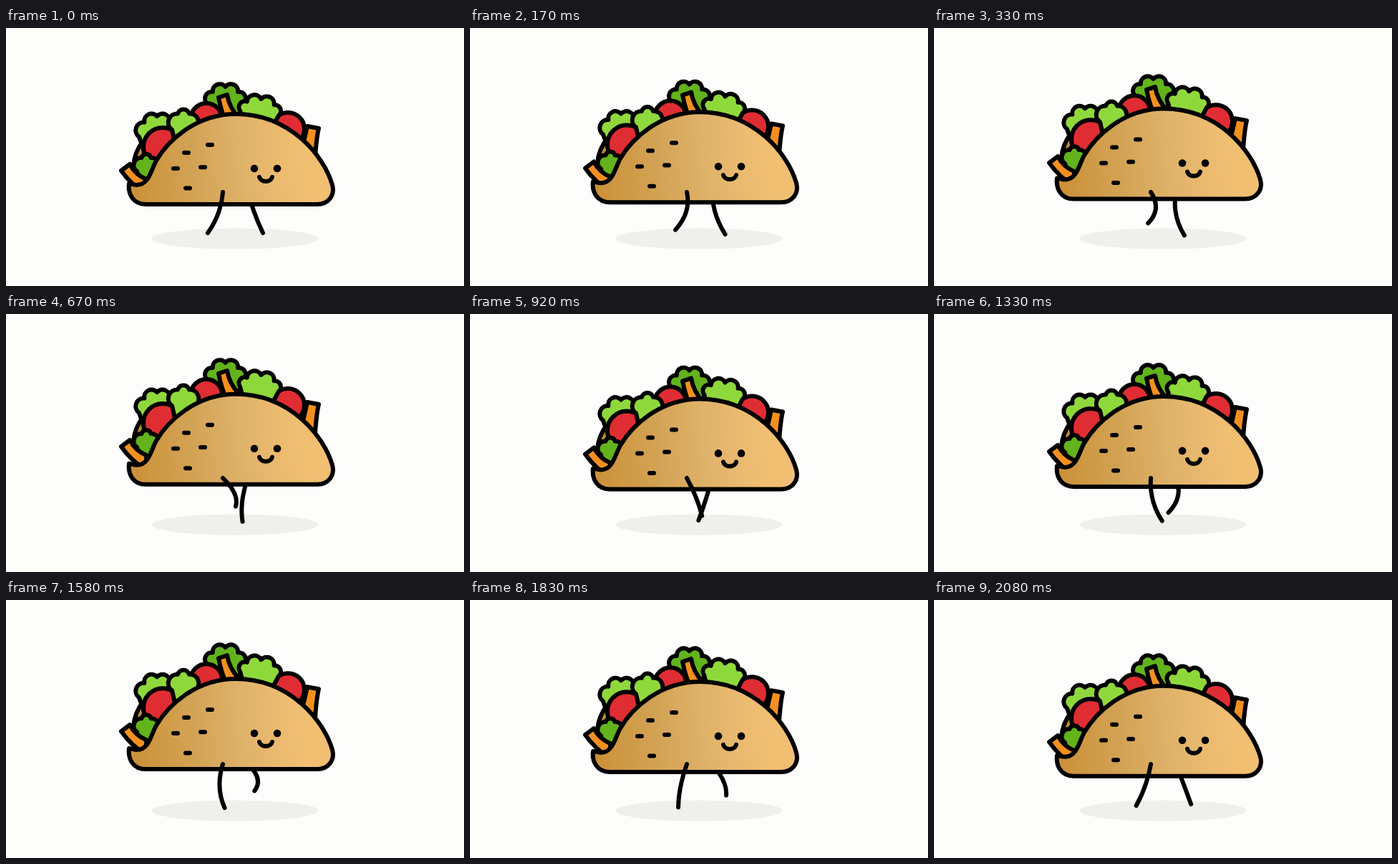
Recreate the animation shown at these times as an HTML page. Size 640 px wide and 360 px high, loop 2.16 s.

```html
<!DOCTYPE html>
<html lang="en">
<head>
<meta charset="utf-8">
<title>Walking taco</title>
<style>
  html, body { margin: 0; width: 100%; height: 100%; overflow: hidden; background: #fdfdfc; }
  svg { display: block; width: 100vw; height: 100vh; }
  .ink { stroke: #000; stroke-width: 6; stroke-linecap: round; stroke-linejoin: round; }
  .line { fill: none; }
  .dark { fill: #62b31c; }
  .light { fill: #8fd83c; }
  .tomato { fill: #e02d33; }
  .carrot { fill: #f39020; }
</style>
</head>
<body>
<svg viewBox="0 0 640 360">
  <defs>
    <linearGradient id="shell" gradientUnits="userSpaceOnUse" x1="172" y1="200" x2="456" y2="180">
      <stop offset="0" stop-color="#cb9038"/>
      <stop offset=".3" stop-color="#d2a253"/>
      <stop offset=".55" stop-color="#dfb26a"/>
      <stop offset=".85" stop-color="#f1bf72"/>
    </linearGradient>
  </defs>
  <ellipse cx="320" cy="294" rx="117" ry="14.5" fill="#efefec"/>
  <path id="backLeg" class="ink line"/>
  <g id="filling" class="ink"></g>
  <g id="body">
    <path class="ink" fill="url(#shell)" d="M195 246H435C450 246 460 234 456 219C445 180 398 120 321 120C265 120 226 158 210 185C203 197 200 219 183 219C178 219 175 217 172 217C170 232 178 246 195 246Z"/>
    <path class="ink line" d="M282 163h6M249 174h6M234 196h6M272 194.2h6M251 223.5h6"/>
    <circle cx="347" cy="196" r="5.3"/>
    <circle cx="379" cy="196" r="5.3"/>
    <path class="ink line" d="M354 208A9.2 7.6 0 0 0 372 208"/>
  </g>
  <path id="frontLeg" class="ink line"/>
</svg>
<script>
const LOOP = 2160, STEPS = 26, HIP_Y = 229, TURN = 2 * Math.PI;
const byId = id => document.getElementById(id);
const filling = byId('filling'), body = byId('body');

function add(tag, kind, attrs) {
  const el = document.createElementNS('http://www.w3.org/2000/svg', tag);
  el.setAttribute('class', kind);
  for (const k in attrs) el.setAttribute(k, attrs[k]);
  filling.append(el);
}
const shape = (kind, d) => add('path', kind, { d });
const slice = (cx, cy, r) => add('circle', 'tomato', { cx, cy, r });

// A leaf: equal lobes around the upper half of an ellipse, closed by a tapering base.
function leaf(kind, cx, cy, rx, ry, lobes, tilt = 0) {
  let d = '', px, py;
  for (let i = 0; i <= lobes; i++) {
    const a = Math.PI * (1 + i / lobes);
    const x = cx + rx * Math.cos(a), y = cy + ry * Math.sin(a);
    const r = Math.hypot(x - px, y - py) * 0.52;
    d += i ? `A${r} ${r} 0 0 1 ${x} ${y}` : `M${x} ${y}`;
    [px, py] = [x, y];
  }
  d += `L${cx + rx * 0.6} ${cy + 28}H${cx - rx * 0.6}Z`;
  add('path', kind, { d, transform: `rotate(${tilt} ${cx} ${cy})` });
}

add('path', '', { d: 'M192 157C185 166 179 179 178 192L205 215L215 165Z', fill: '#c28a35' });
leaf('light', 211, 152, 25, 29, 4);
slice(219, 166, 27);
leaf('dark', 196, 200, 13, 22, 3);
shape('carrot', 'M161 199L173 190Q181 205 196 211V232Q174 218 161 199Z');
leaf('dark', 306.5, 106, 25, 24, 4);
slice(280, 127, 22);
leaf('light', 248, 142, 16, 26, 3);
shape('carrot', 'M297 97L309 93Q312 111 325 125L309 135Q301 118 297 97Z');
shape('carrot', 'M421 137L437 140Q434 152 432 180L412 175Q417 155 421 137Z');
slice(394, 141, 23);
leaf('light', 354, 119, 27, 20, 4, 7);

// First half of the cycle swings the foot forward, second half pushes it back.
function drawLeg(id, hipX, step) {
  const a = TURN * step / STEPS, s = Math.sin(a);
  const swing = Math.max(0, s) ** 2;
  const x = 12 * swing - 21 * Math.cos(a);
  const y = 57 + 4 * Math.max(0, -s) - 20 * swing;
  const knee = 3 + 15 * Math.sin(a + 0.36);
  byId(id).setAttribute('d', `M${hipX} ${HIP_Y}q${x / 2 + knee} ${y / 2 + 2} ${x} ${y}`);
}

// Two bounces per loop, each lifting the element by up to height.
function bounce(el, height, step, lead) {
  const y = height / 2 * (Math.cos(TURN * 2 * (step + lead) / STEPS) - 1);
  el.setAttribute('transform', `translate(0 ${y})`);
}

function draw(time) {
  // Twelve poses a second, switched on whole hundredths
  const tick = Math.floor((time % LOOP) / 10) * 10;
  const step = Math.floor((tick + 5) * 0.012);
  bounce(body, 10, step, 0.3);
  bounce(filling, 16, step, 0);
  drawLeg('frontLeg', 303, step);
  drawLeg('backLeg', 338, step + STEPS / 2);
}

const start = performance.now();
function play() {
  draw(performance.now() - start);
  requestAnimationFrame(play);
}
play();
</script>
</body>
</html>
```
